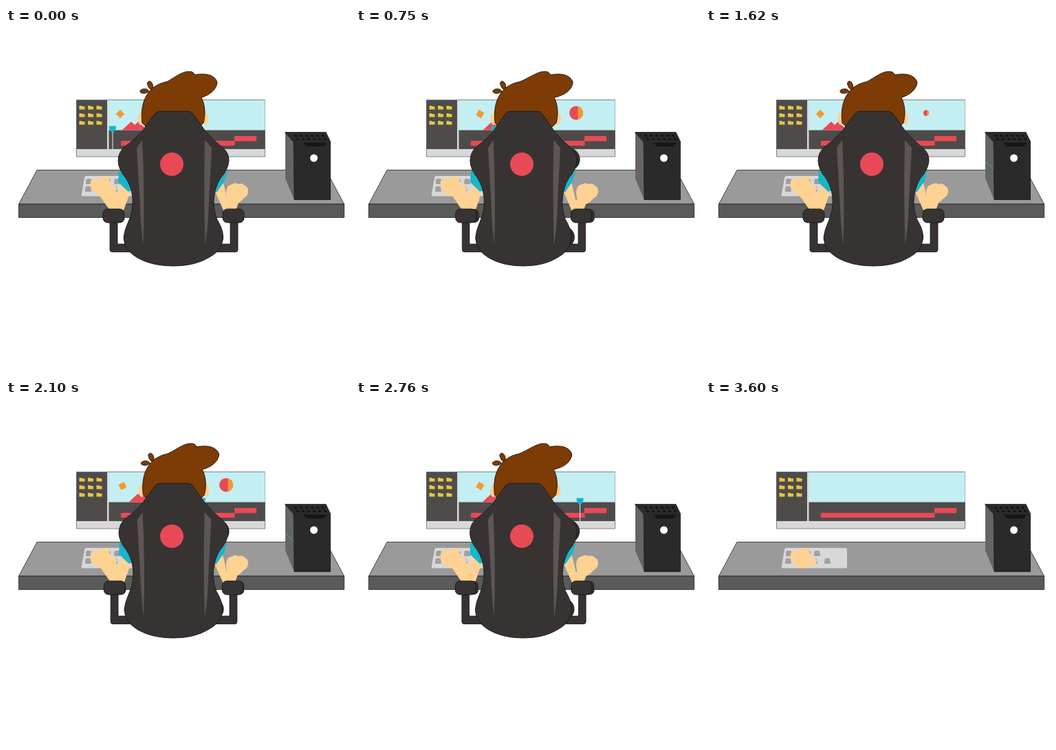
Recreate the animation shown at these times as an HTML page. Size 500x500 px, loop 3.63 s.

```html
<!DOCTYPE html>
<html lang="en">
<head>
<meta charset="utf-8">
<title>Editor at a desk</title>
<style>
  html, body { margin: 0; width: 100%; height: 100%; overflow: hidden; background: #fff; }
  svg { display: block; width: 100vw; height: 100vh; }
  .skin { fill: #fdd293; }
  .red { fill: #e84a55; }
  .orange { fill: #f29a30; }
  .teal { fill: #18b5cb; }
  .shell { fill: #383333; stroke: #151212; stroke-width: .8; }
  .sheen { fill: #5e5555; }
  .hair { fill: #7d3b06; stroke: #1f1004; stroke-width: .9; }
</style>
</head>
<body>
<svg viewBox="0 0 500 500">
  <defs>
    <clipPath id="sky"><path d="M149.500 105H376.500V148.500H149.500z"/></clipPath>
    <clipPath id="side"><path d="M406 152L418 166L419 250L406 219z"/></clipPath>
    <g id="pads">
      <rect x="141" y="263" width="31" height="20" rx="7"/>
      <rect x="315" y="263" width="31" height="20" rx="7"/>
    </g>
  </defs>

  <!-- monitor -->
  <path d="M102.500 104.500H376.500V187H102.500z" fill="#d8d8d8" stroke="#78878b"/>
  <path d="M102.500 105H147V176H102.500zM149.500 148H376.500V176H149.500z" fill="#4f4b4b"/>
  <path d="M149.500 105H376.500V148.500H149.500z" fill="#c3eff2"/>
  <path class="red" d="M168 164H332V157H364V164.500H332.500V171H168Q167 171 167 170V165Q167 164 168 164z"/>
  <g id="folders" fill="#e3c840"></g>

  <g class="live">
    <g clip-path="url(#sky)">
      <path id="square" class="orange" d="M-4.500 -4.500H4.500V4.500H-4.500z"/>
      <path id="hills" class="red" d="M0 0L14 -13L19 -8L24 -13L38 0z"/>
      <g id="ball">
        <circle r="10" class="red"/>
        <path class="orange" d="M2.500 -9.700A10 10 0 0 1 2.500 9.700z"/>
      </g>
    </g>
    <g id="marker">
      <path d="M0 150V176" stroke="#e4eeee"/>
      <path class="teal" d="M-5 142.500H5V146L2 151.500H-2L-5 146z"/>
    </g>
  </g>

  <!-- desk and keyboard -->
  <g stroke="#222" stroke-width=".8">
    <path d="M45 206.500H465L491.500 256H18.500z" fill="#9a9a9a"/>
    <path d="M18.500 256H491.500V275.500H18.500z" fill="#5a5a5a"/>
  </g>
  <path d="M117 215H202Q205 215 205 218V242Q205 244.500 202 244.500H112Q109 244.500 110 241L114 218Q114.500 215 117 215z" fill="#d8d8d8"/>
  <g id="keys" fill="#a0a0a0"></g>
  <path class="skin" d="M123 229Q121 219 130 219Q134 217 139 219Q141 214 147 215Q151 216 150 222Q154 225 153 229Q161 229 161 234Q160 240 153 241Q146 245 137 244Q126 241 123 229z"/>

  <!-- computer -->
  <path d="M406 151.500L418 166L419 250L406 219z" fill="#656565"/>
  <g clip-path="url(#side)"><path id="light" transform="translate(412.500 200) rotate(42)" d="M-13 0H13"/></g>
  <path d="M405.500 151.500H465L471.500 165V249.500H419L418 166z" fill="#2a2a2a" stroke="#111" stroke-width=".7"/>
  <path d="M432 166.500H466L462 172H437z" fill="#161616"/>
  <g id="vents" fill="#111"></g>
  <circle cx="447.500" cy="189" r="5.500" fill="#fff"/>

  <!-- person and chair -->
  <g class="live">
    <g id="head">
      <ellipse class="skin" cx="196" cy="132" rx="4.500" ry="9"/>
      <ellipse class="skin" cx="290" cy="132" rx="4" ry="9"/>
      <path class="hair" d="M214 89Q214 78 208 77Q204 79 206 83Q207 87 212 91zM208 92Q205 87 198 89Q193 91 196 94Q202 97 208 92z"/>
    </g>
    <path id="hair" class="hair"/>
    <path class="skin" d="M320 240Q320 228 329 227Q333 224 338 227Q344 225 347 229Q352 231 352 237Q352 244 346 247Q342 252 335 256L322 254z"/>
    <g id="arms">
      <path class="skin" d="M134 241L154 234L163 241L167 226L181 237L171 265H151zM304 238L316 225L322 250L340 249L334 265H316z"/>
      <path class="teal" d="M164 205L186 234L178 238L163 224zM322 207L300 232L306 239L318 222z"/>
    </g>
    <g id="depth" fill="#322d2d">
      <use href="#pads"/>
      <ellipse cx="181" cy="191" rx="18" ry="17"/>
      <ellipse cx="306" cy="191" rx="18" ry="17"/>
      <ellipse cx="188" cy="304" rx="17" ry="16"/>
      <ellipse cx="299" cy="304" rx="17" ry="16"/>
    </g>
    <g id="chair" class="shell">
      <path d="M151 277H162V314H190V325.500H154Q151 325.500 151 322zM337 277H326V314H297V325.500H334Q337 325.500 337 322z"/>
      <use href="#pads"/>
      <path d="M225 121H263Q269 121 272 125L290 150Q301 163 315 174Q324 181 324 193Q323 206 312 218Q303 231 302 252Q302 272 310 284Q317 297 315 308Q313 324 296 333Q275 346 243 346Q212 346 191 334Q172 323 171 305Q172 294 178 281Q185 266 184 249Q183 231 174 218Q163 205 163 193Q163 181 172 173Q186 163 197 151L216 125Q219 121 225 121z"/>
      <path class="sheen" stroke="none" d="M190 174L198 163Q202 240 199.500 315Q196 290 194.500 250zM299 174L289 163Q287 240 289.500 315Q294 290 295 250z"/>
    </g>
    <circle class="red" cx="241" cy="198" r="17"/>
  </g>
</svg>
<script>
const LOOP = 3630, STEP = 30, PERSON_END = 3600, CYCLE = 1600;
const $ = id => document.getElementById(id);
const place = (id, value) => $(id).setAttribute('transform', value);

// Smooth rise from 0 to 1 between two times.
function ease(t, from, to) {
  const u = Math.min(1, Math.max(0, (t - from) / (to - from)));
  return u * u * (3 - 2 * u);
}
const pulse = (t, up, full, down, end) => ease(t, up, full) - ease(t, down, end);

// The quiff swings twice as far as the head.
function hairPath(h) {
  const head = (x, y) => `${x + h} ${y} `;
  const quiff = (x, y) => `${x + 2 * h} ${y} `;
  return 'M' + head(198, 138) + 'C' + head(194, 106) + head(207, 83) + head(234, 78) +
    'C' + quiff(247, 71) + quiff(259, 60) + quiff(271, 64) + 'L' + quiff(275, 68) +
    'C' + quiff(290, 65) + quiff(304, 68) + quiff(307, 79) +
    'C' + quiff(306, 90) + quiff(295, 98) + head(284, 101) +
    'C' + head(290, 113) + head(290, 126) + head(287, 138) +
    'L' + head(275, 150) + 'H' + (210 + h) + 'z';
}

function draw(t) {
  const p = t % CYCLE;
  const present = t < PERSON_END;
  document.querySelectorAll('.live').forEach(g => g.style.display = present ? '' : 'none');

  const slide = pulse(p, 350, 850, 1050, 1600);
  place('square', `translate(${166 + 16 * slide} 125) rotate(${45 + 85 * slide})`);
  place('hills', `translate(${168 + 17 * pulse(p, 0, 900, 1000, 1750)} 149)`);
  place('ball', `translate(320 123.500) scale(${pulse(p, 0, 45, 950, 1100)})`);
  place('marker', `translate(${155 + t * .0618})`);

  // Sway right, then left, then back to the middle.
  const sway = 4.5 * ease(p, 300, 850) - 7 * ease(p, 1050, 1500) + 2.5 * ease(p, 1500, 1600);
  const narrow = 1 - .036 * Math.min(1, Math.abs(sway) / 4);
  const turn = `translate(243.500) scale(${narrow} 1) translate(-243.500)`;
  place('chair', turn);
  place('arms', turn);
  place('depth', `translate(${sway * 1.1}) ${turn}`);
  place('head', `translate(${sway})`);
  $('hair').setAttribute('d', hairPath(sway));

  const green = pulse(t, 1000, 1500, 2200, 2700);
  $('light').style.stroke = `hsl(${120 * green} 50% 48%)`;
  $('light').style.opacity = present ? .9 * ease(t, 0, 600) - .6 * ease(t, 2100, 2760) : 0;
}

function repeat(id, points, d) {
  $(id).innerHTML = points.map(([x, y]) => `<path transform="translate(${x} ${y})" d="${d}"/>`).join('');
}
const row = (count, x, y, gap) => Array.from({ length: count }, (_, i) => [x + i * gap, y]);

repeat('folders', [113, 124, 135].flatMap(y => row(3, 106.5, y, 12.5)), 'M0 0H3.500L4.500 1H8V5.500H0z');
repeat('keys', [...row(4, 116, 219, 13.7), ...row(4, 115, 230, 19)], 'M2 0H7Q8 0 9 7Q9 8 8 8H1Q0 8 0 7Q0 0 2 0z');
repeat('vents', [...row(6, 419, 155, 8), ...row(6, 422, 160, 8)], 'M0 0H3L4 3H1z');

function frame(now) {
  draw(Math.floor(now % LOOP / STEP) * STEP);
  requestAnimationFrame(frame);
}
draw(0);
requestAnimationFrame(frame);
</script>
</body>
</html>
```
